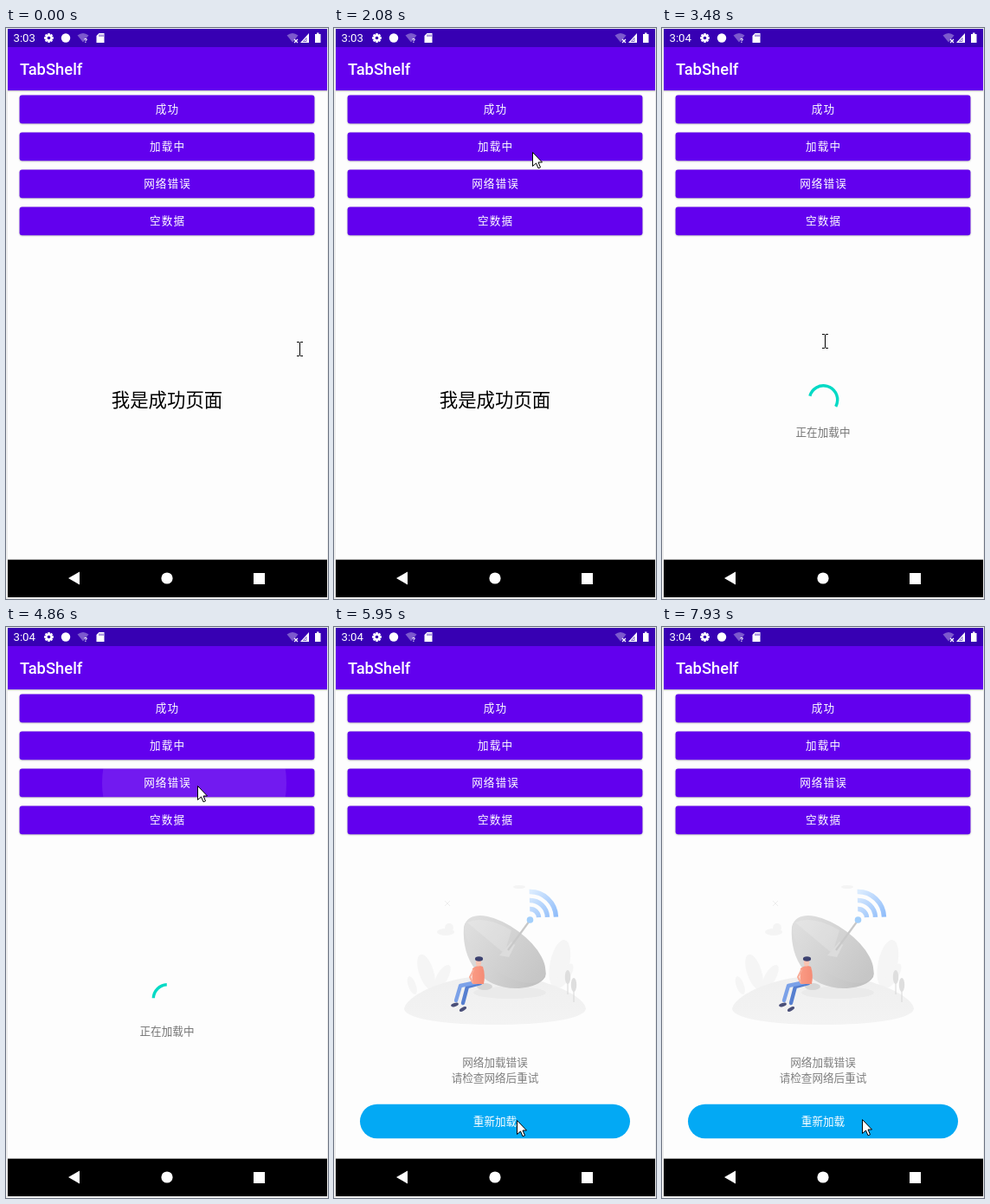
An HTML page with a canvas that plays this animation: 372 by 659 pixels, repeating every 8000 ms.

```html
<!DOCTYPE html>
<html lang="zh-CN">
<head>
<meta charset="utf-8">
<style>
html, body { margin: 0; width: 100%; height: 100%; overflow: hidden; background: #ececec; }
canvas { display: block; width: 372px; height: 659px; }
</style>
</head>
<body>
<canvas id="stage" width="372" height="659"></canvas>
<script>
const ctx = document.getElementById('stage').getContext('2d');
const LOOP = 8000;
const STEP = 135;
const CJK = '"Noto Sans CJK SC", "Noto Sans CJK", "Noto Sans CJK JP", sans-serif';
const PURPLE = '#6200ee';
const LOADING_AT = 2810, ERROR_AT = 5010;
const BUTTONS = ['成功', '加载中', '网络错误', '空数据'];
const PRESSES = [{ button: 1, at: 2670, x: 224 }, { button: 2, at: 4860, x: 217.5 }];

// Each move bends from the previous resting place through its curve's control points.
const REST = [339, 370];
const MOVES = [
  { start: 410, end: 1100, curve: [[400, 560], [340, 700], [222, 447]] },
  { start: 1380, end: 1770, curve: [[262, 300], [239, 125]] },
  { start: 2080, end: 2080, curve: [[229, 143]] },
  { start: 3080, end: 3480, curve: [[215, 290], [188, 361]] },
  { start: 3750, end: 4740, curve: [[40, 340], [430, 150], [221, 183]] },
  { start: 5560, end: 5950, curve: [[330, 380], [300, 660], [211, 569]] },
  { start: 6480, end: 7410, curve: [[200, 400], [182, 50], [212, 226]] },
  { start: 7530, end: 7930, curve: [[231, 568]] }
];

function shape(d, fill) {
  ctx.fillStyle = fill;
  ctx.fill(new Path2D(d));
}
function line(d, color, width, cap = 'butt') {
  ctx.strokeStyle = color;
  ctx.lineWidth = width;
  ctx.lineCap = cap;
  ctx.lineJoin = 'round';
  ctx.stroke(new Path2D(d));
}
function rect(x, y, w, h, fill) {
  ctx.fillStyle = fill;
  ctx.fillRect(x, y, w, h);
}
function roundRect(x, y, w, h, r, fill) {
  ctx.beginPath();
  ctx.roundRect(x, y, w, h, r);
  ctx.fillStyle = fill;
  ctx.fill();
}
function ellipse(x, y, rx, ry, fill, turn = 0) {
  ctx.beginPath();
  ctx.ellipse(x, y, rx, ry, turn, 0, 2 * Math.PI);
  ctx.fillStyle = fill;
  ctx.fill();
}
function arc(x, y, r, from, to, color, width) {
  ctx.beginPath();
  ctx.arc(x, y, r, from, to);
  ctx.strokeStyle = color;
  ctx.lineWidth = width;
  ctx.lineCap = 'butt';
  ctx.stroke();
}
function gradient(x0, y0, x1, y1, from, to) {
  const g = ctx.createLinearGradient(x0, y0, x1, y1);
  g.addColorStop(0, from);
  g.addColorStop(1, to);
  return g;
}
function label(text, cx, cy, size, color, spacing = 0) {
  ctx.font = `400 ${size}px ${CJK}`;
  ctx.letterSpacing = spacing + 'px';
  ctx.textAlign = 'center';
  ctx.fillStyle = color;
  ctx.fillText(text, cx + spacing / 2, Math.round(cy + size * 0.34));
  ctx.letterSpacing = '0px';
}
function latin(text, x, y, font) {
  ctx.font = font + ' Roboto, sans-serif';
  ctx.textAlign = 'left';
  ctx.fillStyle = '#fff';
  ctx.fillText(text, x, y);
}

const stepsSince = (t, start) => Math.floor((t - start) / STEP);

function bezier(points, k) {
  if (points.length === 1) return points[0];
  const blended = points.slice(1).map(([x, y], i) => {
    const [px, py] = points[i];
    return [px + (x - px) * k, py + (y - py) * k];
  });
  return bezier(blended, k);
}

function pointerAt(t) {
  let spot = REST;
  for (const { start, end, curve } of MOVES) {
    if (t < start) break;
    const count = Math.round((end - start) / STEP) + 1;
    const k = t >= end ? 1 : Math.min(1, (stepsSince(t, start) + 1) / count);
    spot = bezier([spot, ...curve], k);
  }
  return spot.map(Math.round);
}

function drawPointer(t) {
  const [x, y] = pointerAt(t);
  const overControl = y < 245 || (t >= ERROR_AT && y > 550);
  ctx.save();
  ctx.translate(x + 0.5, y + 0.5);
  if (overControl) {
    const d = 'M0 0V16L4 12.5L6.5 18.3L9 17.3L6.5 11.5H11Z';
    shape(d, '#fff');
    line(d, '#000', 1);
  } else {
    line('M0 -7V7M-3 -8H-1M1 -8H3M-3 8H-1M1 8H3', '#000', 1, 'square');
  }
  ctx.restore();
}

function drawWifi(x, mark) {
  shape(`M${x - 6.5} 8.5Q${x} 3.5 ${x + 6.5} 8.5L${x} 16.5Z`, 'rgba(255,255,255,.35)');
  if (mark === '?') latin('?', x + 1, 17, '700 8px');
  else line(`M${x + 2} 13l4 4m0 -4l-4 4`, '#fff', 1.2);
}

function drawGear(x, y) {
  for (let i = 0; i < 4; i++) {
    const a = i * Math.PI / 4, c = 5.4 * Math.cos(a), s = 5.4 * Math.sin(a);
    line(`M${x - c} ${y - s}L${x + c} ${y + s}`, '#fff', 2.6);
  }
  ellipse(x, y, 4.3, 4.3, '#fff');
  ellipse(x, y, 1.8, 1.8, '#3700b3');
}

function drawStatusBar(t) {
  rect(2, 1, 369, 21, '#3700b3');
  latin(t < LOADING_AT ? '3:03' : '3:04', 8.5, 16.4, '400 13.2px');
  drawGear(49.5, 11.5);
  ellipse(69, 11.5, 5.2, 5.2, '#fff');
  drawWifi(89, '?');
  shape('M107.5 6H113.5V17H104.5V9Z', '#fff');
  line('M108 7.5V10M110 7.5V10M112 7.5V10', '#3700b3', 0.8);
  drawWifi(331, 'x');
  shape('M340 17L350 6V17Z', '#fff');
  line('M343.5 15.5L347 11.5V15.5Z', '#3700b3', 0.6);
  shape('M357 7H359V5.5H361.5V7H363.5V17H357Z', '#fff');
}

function drawAppBar() {
  rect(2, 72, 369, 1, '#cdcdcd');
  rect(2, 73, 369, 1, '#ececec');
  rect(2, 22, 369, 50, PURPLE);
  latin('TabShelf', 16, 54, '500 18.4px');
}

function drawRipple(press, y, t) {
  const age = stepsSince(t, press.at);
  if (age < 0 || age > 2) return;
  const r = 106.5 + age * 250;
  const alpha = age === 1 ? 0.24 : 0.1;
  ctx.clip();
  ellipse(press.x, y, r, r, `rgba(255,255,255,${alpha})`);
}

function drawButtons(t) {
  BUTTONS.forEach((text, i) => {
    const middle = 94 + 43 * i;
    ctx.save();
    ctx.shadowColor = 'rgba(0,0,0,.28)';
    ctx.shadowBlur = 2;
    ctx.shadowOffsetY = 0.6;
    roundRect(15.6, middle - 16.5, 340.8, 32.8, 3, PURPLE);
    ctx.shadowColor = 'transparent';
    PRESSES.filter(p => p.button === i).forEach(p => drawRipple(p, middle, t));
    ctx.restore();
    label(text, 186, middle, 12.6, '#fff', 1.1);
  });
}

function drawSpinner(t) {
  const since = stepsSince(t, 3480) * STEP, rad = Math.PI / 180;
  const ease = u => u * u * (3 - 2 * u);
  const phase = (since / 1186 + 2.6765) % 1;
  const tail = ease(Math.max(0, phase * 2 - 1));
  const head = ease(Math.min(1, phase * 2));
  const turn = 57 + 0.1675 * since + 90 * phase;
  arc(186.5, 429, 16.2, (turn + 270 * tail) * rad, (turn + 270 * head + 1) * rad, '#03dac5', 3.4);
}

function leaf(x, y, length, turn, color = '#f5f5f5') {
  const lean = turn * Math.PI / 180;
  ellipse(x + Math.sin(lean) * length / 2, y - Math.cos(lean) * length / 2,
    length / 5, length / 2, color, lean);
}

function drawScenery() {
  ellipse(129, 352, 10, 4, '#f4f4f4');
  ellipse(133, 347, 5, 5, '#f4f4f4');
  ellipse(214, 300, 7, 2, '#f4f4f4');
  line('M128 316l6 6m0 -6l-6 6', '#eee', 1);
  leaf(113, 418, 42, -18);
  leaf(117, 418, 32, 30);
  leaf(94, 424, 22, -20);
  leaf(255, 416, 56, 12);
  leaf(258, 416, 32, 32);
  shape('M81 441C83 425 130 402 187 402C240 402 290 425 291 441C288 453 240 459 187 459C130 459 84 453 81 441Z',
    gradient(0, 402, 0, 459, '#efefef', '#f3f3f3'));
  ellipse(203, 422, 42, 7, '#eaeaea');
  [[270, 397], [277, 406]].forEach(([x, y]) => {
    line(`M${x} ${y + 10}v17`, '#d6d6d6', 1);
    leaf(x, y + 15, 16, 0, '#dedede');
  });
}

function drawDish() {
  shape('M150 346C147 386 171 419 214 417Q237 415 244 404Q247 396 238 381L166 337Q152 335 150 346Z',
    gradient(155, 390, 230, 412, '#dadada', '#c2c2c2'));
  ctx.save();
  ctx.translate(197.5, 372);
  ctx.rotate(0.64);
  ellipse(0, 0, 55, 26, gradient(-50, 0, 50, 0, '#dedede', '#c6c6c6'));
  ctx.restore();
  shape('M197 377L154 341Q174 332 205 350Z', 'rgba(255,255,255,.18)');
  shape('M191 379L205 363L209 367L202 381Z', '#dcdcdc');
  line('M201 373L226 339', '#c8c8c8', 2.2);
  ellipse(226.5, 338, 3.8, 3.8, '#a3cffb');
  const blue = gradient(226, 306, 256, 336, '#dcecfe', '#8ebcfa');
  [10, 20, 30].forEach(r => arc(226.5, 335.5, r, -1.6, -0.03, blue, 5.4));
}

function drawSitter() {
  ellipse(174, 415, 9, 4, '#d6d6d6');
  line('M169 411L154 415L149 434', '#567fd0', 4.4, 'round');
  line('M165 410L146 414L141 431', '#7ba1e8', 4.4, 'round');
  ellipse(139.5, 436, 4.5, 2, '#4a4f78', -0.3);
  ellipse(149, 441, 4.5, 2, '#4a4f78', -0.5);
  shape('M160 394Q166 389 172 392Q175 401 173 412H160Q159 404 160 394Z',
    gradient(158, 0, 175, 0, '#fb9d86', '#f48a74'));
  line('M161 396L157 404L160 410', '#f9ab97', 2, 'round');
  ellipse(167, 387, 3.2, 4.6, '#f8c4b2');
  ellipse(167.5, 383, 4.6, 2.8, '#3d4270');
}

function drawError() {
  drawScenery();
  drawDish();
  drawSitter();
  label('网络加载错误', 186, 503, 12.6, '#7f7f7f');
  label('请检查网络后重试', 186, 521, 12.6, '#7f7f7f');
  roundRect(30, 550.8, 312, 39.4, 19.7, '#03a9f4');
  label('重新加载', 186, 571, 12.6, '#fff');
}

function drawPage(t) {
  if (t < LOADING_AT) {
    label('我是成功页面', 186, 430, 21.4, '#000');
  } else if (t < ERROR_AT) {
    drawSpinner(t);
    label('正在加载中', 186, 467, 12.6, '#757575');
  } else {
    drawError();
  }
}

function drawNavBar() {
  rect(2, 613.6, 369, 43.4, '#000');
  shape('M72 635L85 627.5V642.5Z', '#fff');
  ellipse(186, 635, 6.6, 6.6, '#fff');
  rect(286, 629, 13, 13, '#fff');
}

function draw(t) {
  rect(0, 0, 372, 659, '#ececec');
  rect(2, 1, 369, 656, '#fdfdfd');
  drawStatusBar(t);
  drawAppBar();
  drawButtons(t);
  drawPage(t);
  drawNavBar();
  drawPointer(t);
}

const began = performance.now();
function frame() {
  draw((performance.now() - began) % LOOP);
  requestAnimationFrame(frame);
}
frame();
</script>
</body>
</html>
```
